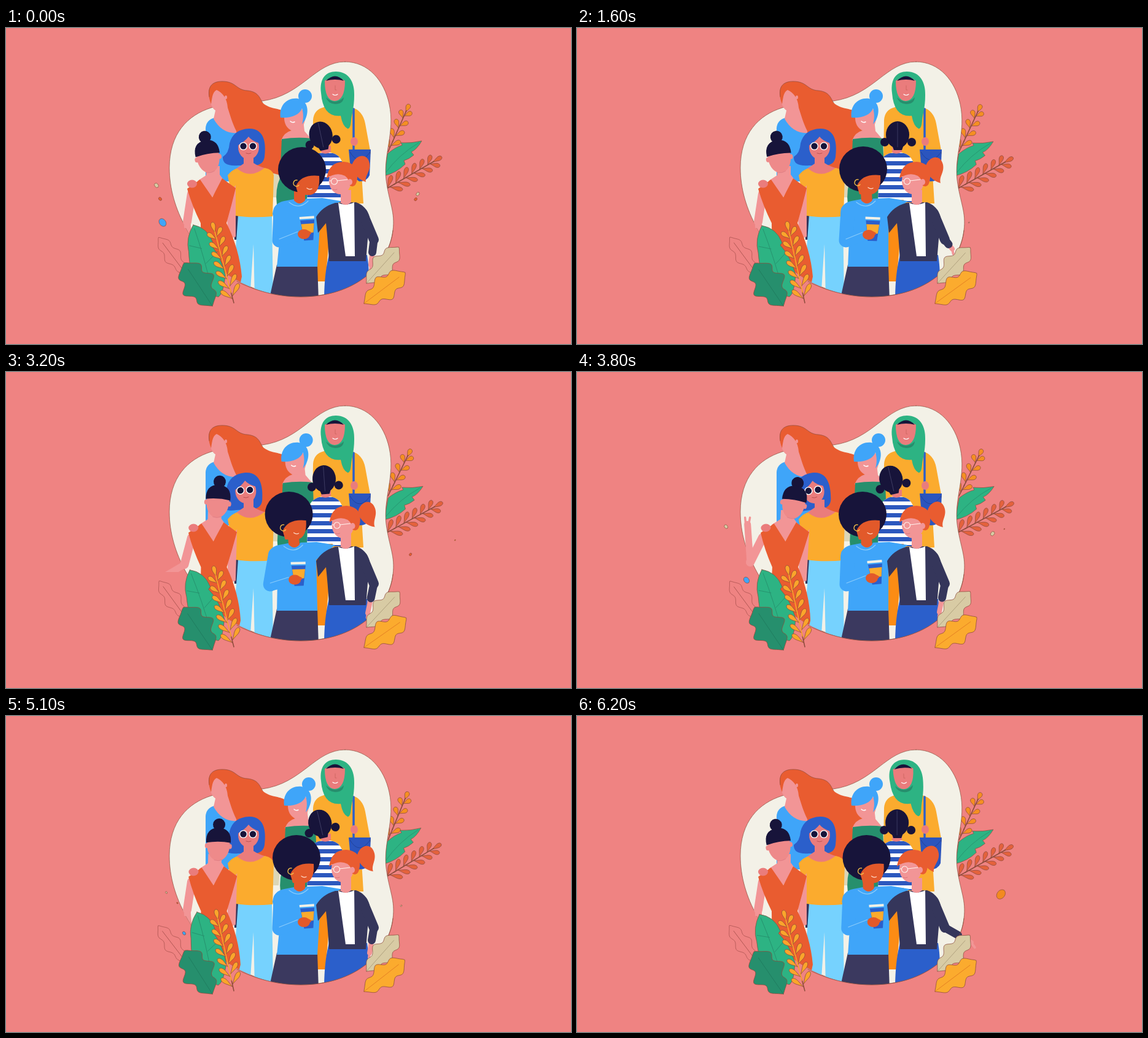
These frames come from a looping animation (920x515 px, 6.3 s). An HTML page with a canvas:

```html
<!DOCTYPE html>
<html lang="en">
<head>
<meta charset="utf-8">
<title>Women together</title>
<style>
html, body { margin: 0; width: 100%; height: 100%; overflow: hidden; background: #ef8382 }
canvas { display: block }
</style>
</head>
<body>
<canvas id="stage" width="920" height="515"></canvas>
<script>
const ctx = document.getElementById('stage').getContext('2d');
const C = { bg: '#ef8382', cream: '#f3f1e7', red: '#e95c30', amber: '#fbab2e', sky: '#3fa5f9', pale: '#76d2fe',
  royal: '#2b5fcb', ink: '#17143a', navy: '#35365b', green: '#2db383', pine: '#268f6d', beige: '#d8cba4',
  skin: '#f29596', blush: '#ee8a8a', rose: '#ea7c7c', brown: '#e2592a', orange: '#fc8c14', edge: '#8c4b3c', white: '#fff' };
const LOOP = 6300, CYCLE = 5450, STEP = 100;
const KEYS = [0, 700, 1600, 2600, 3800, 5100];
const HEADS_AND_ROOM = 'M0 0H920V330H630C624 385 570 438 480 438C390 438 325 385 293 326H0Z';
const BLOB = 'M552 55C590 55 616 86 624 124C634 170 614 205 619 248C624 285 634 300 630 330C624 385 570 438 480 438' +
  'C390 438 325 385 293 326C276 295 266 262 266 228C266 172 296 142 334 130C362 121 390 126 417 119C483 110 503 55 552 55Z';
let now = 0;

// Smooth periodic curve through one value per key time, flat at extremes
function pose(...v) {
  const n = KEYS.length;
  const time = k => KEYS[(k + n) % n] + CYCLE * Math.floor(k / n);
  const val = k => v[(k + n) % n];
  const slope = k => (val(k + 1) - val(k)) * (val(k) - val(k - 1)) <= 0 ? 0
    : (val(k + 1) - val(k - 1)) / (time(k + 1) - time(k - 1));
  let i = n - 1;
  while (KEYS[i] > now) i--;
  const d = time(i + 1) - time(i), s = (now - time(i)) / d, s2 = s * s, s3 = s2 * s;
  return (2 * s3 - 3 * s2 + 1) * val(i) + (s3 - 2 * s2 + s) * d * slope(i)
    + (3 * s2 - 2 * s3) * val(i + 1) + (s3 - s2) * d * slope(i + 1);
}
function ramp(from, to) {
  const s = Math.min(1, Math.max(0, (now - from) / (to - from)));
  return s * s * (3 - 2 * s);
}
function fill(color, d, outline) {
  const p = new Path2D(d);
  ctx.fillStyle = color;
  ctx.fill(p);
  if (outline) line(outline, .7, p);
}
function line(color, width, d) {
  ctx.strokeStyle = color;
  ctx.lineWidth = width;
  ctx.lineCap = ctx.lineJoin = 'round';
  ctx.stroke(new Path2D(d));
}
function oval(color, x, y, rx, ry = rx, tilt = 0, outline) {
  const p = new Path2D();
  p.ellipse(x, y, rx, ry, tilt, 0, 2 * Math.PI);
  fill(color, p, outline);
}
function group(draw, { x = 0, y = 0, turn = 0, lean = 0, px = 0, py = 0 }) {
  ctx.save();
  ctx.translate(px + x, py + y);
  ctx.rotate(turn * Math.PI / 180);
  ctx.transform(1, 0, -lean, 1, 0, 0);
  ctx.translate(-px, -py);
  draw();
  ctx.restore();
}
const place = (x, y, turn, draw) => group(draw, { x, y, turn });

// Lobed leaf, narrow at its base
function oak(x, y, turn, len, half, color, vein, outline = C.edge) {
  let top = '', back = '';
  for (let i = 0; i <= 48; i++) {
    const s = i / 48, w = half * Math.sin(Math.PI * s ** 1.1) ** .65 * (1 + .24 * Math.sin(s * 18.5 - 1.2));
    top += `L${s * len} ${-w || 0}`;
    back = `L${s * len} ${w || 0}` + back;
  }
  place(x, y, turn, () => {
    fill(color, 'M0 0' + top + back + 'Z', outline);
    line(vein, .8, `M0 0H${len * .85}`);
  });
}
function teardrop(x, y, turn, l, t, color) {
  place(x, y, turn, () => fill(color, `M0 0C${l * .4} ${-t * .3} ${l * .6} ${-t * 1.4} ${l * .88} ${-t * .85}
    C${l * 1.04} ${-t * .4} ${l * 1.04} ${t * .4} ${l * .88} ${t * .85}C${l * .6} ${t * 1.4} ${l * .4} ${t * .3} 0 0Z`, C.edge));
}
function sprig(x, y, turn, len, pairs, size, thick, color, stem) {
  place(x, y, turn, () => {
    const tip = len - size * .8;
    for (let i = 0; i < pairs; i++) {
      const s = (i + .4) / pairs, l = size * (1 - .25 * s);
      for (const side of [-1, 1]) teardrop(s * tip + (side > 0 ? 4 : 0), 0, side * 42, l, thick, color);
    }
    teardrop(tip, 0, 0, size * .8, thick, color);
    line(C.edge, 1.5, 'M0 0H20');
    line(stem, 1.6, `M18 0H${tip + 3}`);
  });
}

function rightPlants() {
  const sway = pose(0, 1, 1, 1.8, 2.4, -1.4);
  sprig(622, 202, -66 + sway, 85, 4, 18, 3.7, '#f58f22', C.edge);
  sprig(616, 264, -30 + sway * .7, 108, 6, 22, 3.4, '#e4623c', C.edge);
  group(() => {
    fill(C.green, 'M616 241L621 205Q634 194 645 191L643 187Q660 188 677 184Q669 198 660 202L664 207Q656 214 648 216L650 222Q636 236 616 241Z', C.edge);
    line(C.pine, .8, 'M618 236Q640 206 672 187');
  }, { turn: sway, px: 618, py: 236 });
}

function longHair() {
  fill(C.sky, 'M325 250V163Q326 150 340 146L380 168L392 250Z');
  fill(C.skin, 'M342 130L338 148Q352 173 377 171L362 118Z');
  oval(C.skin, 347, 118, 14, 18);
  const x = pose(0, -1, 0, -1, 1, 2);
  fill(C.red, `M334 124C325 100 332 87 352 87C375 87 374 101 393 102C412 104 413 115 418 122C430 133 445 130 455 137
    C${475 + x} 150 ${480 + x} 175 468 200L455 240H398C385 215 378 190 375 168C368 154 365 142 361 130
    C360 114 352 105 343 101C337 104 336 110 334 124Z`);
  line(C.edge, .7, 'M331 112C328 94 337 87 352 87C375 87 374 101 393 102C412 104 413 115 418 122');
  oval(C.skin, 358, 113, 2, 3);
}

function blueBun() {
  fill('#dcd6b6', 'M432 236L447 240L444 276H433Z');
  group(() => {
    fill(C.skin, 'M448 183Q453 170 465 167V150H484L486 168L498 182Z');
    fill(C.pine, 'M449 181Q475 177 498 180L502 288H441Q438 262 446 245Z');
    oval(C.skin, 470, 147, 17, 21);
    fill(C.sky, 'M447 146C444 126 458 113 475 115C492 118 494 136 487 150L482 157C485 146 484 138 482 131C478 142 464 147 447 146Z');
    oval(C.sky, 487, 111, 11);
    line(C.white, 1.4, 'M463 152Q466 155 470 153');
  }, { x: pose(0, 0, 0, 0, 4, 6) });
}

function headscarf() {
  fill(C.amber, 'M500 150Q501 133 518 129H562Q581 134 585 156L594 205H577L582 286H498Z');
  line(C.royal, 3.5, 'M566 132V200');
  fill('#2b55be', 'M558 198H594L592 240Q588 250 575 250L562 240Z');
  line('#1f429c', 1, 'M560 202Q575 228 593 202');
  oval(C.rose, 567, 185, 6, 7);
  group(() => {
    fill(C.green, 'M513 106C510 82 521 71 537 71C558 71 568 88 567 110C567 130 563 140 562 150Q561 165 556 164Q548 160 545 143Q516 146 513 106Z');
    fill(C.pine, 'M521 113Q536 127 550 113Q549 124 536 124Q524 123 521 113Z');
    fill(C.rose, 'M519 86Q519 118 535 119Q552 118 552 86Q536 76 519 86Z');
    fill(C.ink, 'M521 86Q536 71 550 86Q536 82 521 86Z');
    line(C.white, 1.2, 'M532 108Q536 111 540 108');
    line('#c9645f', .8, 'M536 94V101H538');
  }, { x: pose(0, -1.5, 0, 0, 0, 0), turn: pose(0, -3, 0, 0, 0, 0), px: 540, py: 145 });
}

function stripes() {
  ctx.save();
  const torso = 'M490 284L492 222Q498 204 517 203H528Q546 206 549 225V284Z';
  fill(C.white, torso);
  ctx.clip(new Path2D(torso));
  ctx.fillStyle = '#2c58be';
  for (let y = 204; y < 284; y += 13) ctx.fillRect(485, y, 70, 7);
  ctx.restore();
  fill(C.rose, 'M514 192H529V202Q521 207 513 203Z');
  group(() => {
    oval(C.ink, 521, 174, 19, 22);
    fill(C.ink, 'M511 188H532L528 199H515Z');
    oval(C.ink, 500, 186, 7);
    oval(C.ink, 544, 186, 7);
    line('#45436a', .8, 'M521 154V194');
  }, { x: pose(-4, 0, 1, 2, -5, -5), turn: pose(-12, 0, 0, 5, -13, -13), px: 521, py: 195 });
}

function sunglasses() {
  fill(C.navy, 'M370 300H384V345H372Z');
  fill(C.pale, 'M378 305H433L435 442H405L403 352L397 442H368Z');
  group(() => {
    fill(C.royal, 'M396 164C424 164 423 194 421 210Q419 224 403 224H378Q352 226 353 210Q363 204 364 188Q370 165 396 164Z');
    oval(C.rose, 395, 194, 17, 20);
    fill(C.royal, 'M376 192Q377 172 396 172Q412 172 413 188Q400 184 395 177Q388 186 376 192Z');
    for (const x of [386.5, 402]) {
      oval(C.white, x, 192.5, 6.6);
      oval(C.ink, x, 192.5, 5.2);
    }
    line('#b94f4f', .9, 'M391 204Q395 206 399 204');
  }, { x: pose(0, 0, 0, 0, -6, 0), turn: pose(0, 0, 0, 0, -7, 0), px: 395, py: 222 });
  fill(C.rose, 'M387 208H403V220Q412 226 424 229Q398 252 372 231L387 221Z');
  fill(C.amber, 'M361 240Q368 231 376 229Q398 247 421 228Q434 230 436 240L434 307Q400 310 374 306Z');
}

function vNeck() {
  const up = ramp(3000, 3500) - ramp(4300, 4800);
  const ex = 295 - 13 * up, ey = 316 - 6 * up, a = (86 + 180 * up) * Math.PI / 180, len = 28 + 34 * up;
  const hx = ex + len * Math.cos(a), hy = ey + len * Math.sin(a);
  line(C.skin, 14, `M302 270L${ex} ${ey}`);
  line(C.skin, 11, `M${ex} ${ey}L${hx} ${hy}`);
  if (up > .4) line(C.skin, 3.4, `M${hx - 3} ${hy}l-1 -11M${hx + 2} ${hy}l2 -11`);
  group(() => {
    fill(C.skin, 'M374 256V340L362 345L358 280Z');
    fill(C.skin, 'M326 225H348V239L354 247L335 277L312 249L326 240Z');
    fill(C.red, 'M295 262L316 247L336 276L352 245L374 261Q367 290 359 318Q380 360 384 405L380 424H318L317 318Q303 290 295 262Z');
    oval(C.rose, 303, 254, 8, 6.5);
  }, { lean: pose(0, 0, 0, 0, .055, .03), px: 335, py: 335 });
  group(() => {
    oval(C.blush, 335, 210, 18.5, 26);
    oval(C.blush, 316, 212, 3, 4);
    oval(C.blush, 354, 212, 3, 4);
    oval(C.ink, 335, 177, 10);
    fill(C.ink, 'M315 207Q313 183 335 182Q356 183 355 206Q335 203 315 207Z');
    line('#df7f86', .9, 'M329 235Q336 237 342 234');
  }, { x: pose(-2, -2, -2, 0, 13, 10), y: pose(0, 0, 0, 0, 3, 0), turn: pose(-9, -9, -8, -3, 11, 2), px: 335, py: 236 });
}

function coffee() {
  fill(C.orange, 'M500 280H532L520 413H502Z');
  fill('#3b395f', 'M441 386H507L509 445H428Z');
  const shift = pose(0, -3, -6, -10, -6, 0);
  group(() => {
    fill(C.sky, 'M434 303Q436 285 453 282L469 279Q478 288 489 278L515 277L545 282L512 306L507 389H441L445 350Z');
    fill(C.brown, 'M469 258H487V281Q478 291 469 281Z');
    line('#8accfb', 1.2, 'M461 284Q477 297 492 282');
  }, { lean: shift / 103, px: 473, py: 388 });
  group(() => {
    oval(C.ink, 482, 231, 39, 37);
    fill(C.brown, 'M472 258Q480 238 510 241Q512 268 496 272L476 272Z');
    line('#f5c04a', 1.3, 'M474 248A5 5 0 1 0 477 256');
    line('#ffd9c8', 1.3, 'M490 261Q494 264 498 262');
  }, { x: pose(0, -10, -16, -24, -17, -9), y: pose(0, 0, -1, 1, 1, 0) });
  const ex = pose(445, 442, 438, 424, 439, 445);
  const hx = pose(484, 482, 474, 462, 479, 484), hy = pose(336, 336, 337, 341, 336, 336);
  line(C.sky, 23, `M${447 + shift} 298L${ex} 346`);
  line(C.sky, 18, `M${ex} 348L${hx - 12} ${hy + 3}`);
  line('#8accfb', 1.1, `M${ex} 344L${hx - 9} ${hy - 4}`);
  place(hx + 7, hy - 10, pose(-4, -4, 2, 2, -5, -4), () => {
    fill(C.royal, 'M-11 -13H12L8 20H-7Z');
    fill(C.amber, 'M-10 -7H11L9 8H-8Z');
    fill(C.cream, 'M-12 -19H12V-15H-12Z');
  });
  oval(C.brown, hx + 1, hy, 10, 8);
  oval(C.brown, hx + 8, hy - 2, 5, 3);
}

function ponytail() {
  fill(C.royal, 'M526 370H588Q592 395 590 412L555 445H518Q518 400 526 370Z');
  fill(C.navy, 'M505 308Q515 291 536 285L570 284Q587 290 592 308L586 380H526Q524 345 521 318L508 334Z');
  fill(C.white, 'M541 285Q553 291 567 284L568 372H553Z');
  fill(C.skin, 'M545 264H562V284Q553 292 545 285Z');
  group(() => {
    group(() => fill(C.red, 'M563 224C568 206 589 202 592 221C594 234 584 240 586 251C574 247 566 238 563 224Z'),
      { x: pose(0, -2, 1, 6, 4, 4), y: pose(0, 2, 3, 7, 4, 5), turn: pose(0, 4, -4, -16, -6, -8), px: 568, py: 222 });
    oval(C.skin, 544, 249, 18, 22);
    fill(C.red, 'M522 245Q526 218 550 218Q575 220 572 245Q570 262 560 257Q559 246 552 241Q538 234 522 245Z');
    oval(C.skin, 560, 251, 4, 5);
    line('#fff3ee', 1.1, 'M534 245A5 5 0 1 0 535 255A5 5 0 0 0 534 245M539 249L556 247M526 249H529');
    line('#d87379', .9, 'M532 263Q536 265 539 263');
  }, { x: pose(0, -1, 3, 6, 3, 4) });
}

function hipArm() {
  const hx = pose(594, 642, 611, 591, 590, 592), hy = pose(386, 370, 360, 390, 391, 386);
  const ex = 599, ey = 345, cuffX = (ex + hx) / 2, cuffY = (ey + hy) / 2;
  line(C.skin, 8, `M${cuffX} ${cuffY}L${hx} ${hy}`);
  line(C.skin, 4, `M${hx} ${hy}l${(hx - ex) * .14} 8`);
  line(C.navy, 16, `M581 302L${ex} ${ey}`);
  line(C.navy, 13, `M${ex} ${ey}L${cuffX} ${cuffY}`);
}

function frontPlants() {
  const sway = pose(0, 0, 1, 2.4, 1, -1);
  const leaf = pose(2, -2, 0, -1, 0, 5);
  oak(294, 402, -127 + sway * .5, 76, 12, 'transparent', '#a9514e', '#a9514e');
  group(() => {
    fill(C.green, 'M301 322Q325 326 334 350L331 354Q348 372 356 402Q354 432 346 438L322 432Q296 402 295 366Q289 344 301 322Z', C.edge);
    line(C.pine, .9, 'M303 328Q320 372 336 430M316 360L296 356M324 384L342 364');
  }, { turn: leaf, px: 336, py: 435 });
  oak(336, 453, -124 + leaf * .3, 84, 24, C.pine, '#1f7a5d');
  sprig(371, 448, -104 + pose(-1, -1, 1.5, -2, 1.5, 1.5), 136, 7, 24, 3.6, '#fba52b', '#fba52b');
  oak(587, 416, -48 + sway * .5, 79, 16, C.beige, '#a99a78');
  oak(583, 449, -37 + sway, 84, 18, C.amber, '#e27a22');
}

// start, from x y, to x y, radius, colour
const confetti = [
  [4950, 305, 370, 205, 264, 7, C.sky], [3510, 305, 370, 205, 264, 7, C.sky],
  [4950, 268, 301, 222, 212, 4, C.beige], [3250, 268, 301, 222, 212, 3.5, C.beige],
  [4950, 291, 316, 211, 241, 3, C.red], [4950, 632, 326, 709, 215, 3.2, C.beige],
  [5150, 650, 295, 707, 242, 3.4, C.red], [1520, 632, 326, 709, 215, 4, C.beige],
  [3220, 632, 326, 709, 218, 4, C.beige], [2900, 640, 318, 702, 249, 3, C.red],
  [1640, 640, 310, 711, 229, 5, C.red], [220, 640, 315, 735, 269, 8.5, '#f28a20'],
  [2240, 640, 324, 735, 272, 8, '#f28a20']
];
function drawConfetti() {
  for (const [start, x0, y0, x1, y1, r, color] of confetti) {
    const p = (now - start + CYCLE) % CYCLE / 1000;
    if (p >= 1) continue;
    const size = r * Math.sin(Math.PI * p);
    oval(color, x0 + (x1 - x0) * p, y0 + (y1 - y0) * p, size, size * .75, x1 < x0 ? .9 : -.9, C.edge);
  }
}

function frame(t) {
  now = Math.floor(t % LOOP / STEP) * STEP % CYCLE;
  ctx.fillStyle = C.bg;
  ctx.fillRect(0, 0, 920, 515);
  rightPlants();
  drawConfetti();
  fill(C.cream, BLOB, C.edge);
  ctx.save();
  ctx.clip(new Path2D(HEADS_AND_ROOM));
  for (const woman of [longHair, headscarf, blueBun, stripes, sunglasses, vNeck, coffee, ponytail]) woman();
  ctx.restore();
  hipArm();
  line(C.edge, .7, 'M630 330C624 385 570 438 480 438C440 438 405 428 376 413');
  frontPlants();
  requestAnimationFrame(() => frame(performance.now()));
}
frame(0);
</script>
</body>
</html>
```
